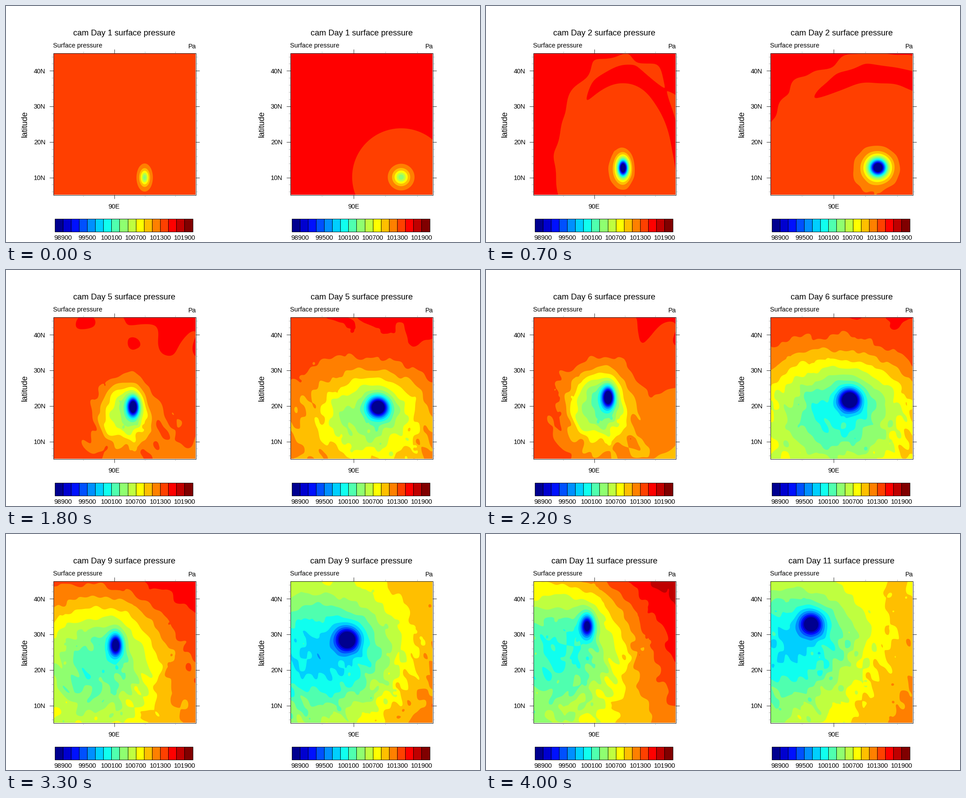
Animation of 1058 by 529 pixels, one loop 4.1 s. Source, as a matplotlib script:

```python
import numpy as np
import matplotlib.pyplot as plt
from matplotlib.animation import FuncAnimation
from matplotlib.patches import Rectangle

W, H, DPI = 1058, 529, 128
FRAMES, SHIFT = 41, 529
LEFT, TOP, SIZE = 106, 106, 317
KEYS = [0, 7, 14, 22, 33, 40]


def jet(i):
    t = np.interp(i, [0, 8, 9, 16], [0.5625, 2.5625, 2.75, 4.5])
    return [np.clip(min(t - k, 5 - 2 + k - t + (2 - 2 * k) + 2 * k - 2 + 0), 0, 1)
            for k in (2, 1, 0)]


COLORS = np.array([jet(i) for i in range(17)])

# Positions are panel-local pixels; corners are the ambient level NW, NE, SW, SE.
PANELS = [
    dict(aspect=0.58, lon_ticks=(173, 241.5, 309.5, 378),
         eye_x=[203.5, 200, 189, 167, 139, 120],
         eye_y=[278.5, 257, 222, 179, 143, 100],
         low_w=[10, 65, 130], low_h=[25, 80, 135],
         corners=[[13.5] * 4, [14.3] * 4, [13.9, 14.5, 13.4, 13.6],
                  [13.5, 14.3, 13.4, 11.7], [13.7, 14.6, 10.5, 12.2],
                  [12.3, 15.5, 9.0, 12.5]]),
    dict(aspect=1.0, lon_ticks=(705, 776, 847, 917.5),
         eye_x=[247, 240, 215, 177, 127, 91],
         eye_y=[277.5, 256, 218, 185, 131, 96],
         low_w=[10, 145, 155], low_h=[25, 115, 130],
         corners=[[14.3] * 4, [14.3] * 4, [13.9, 14.5, 13.6, 13.3],
                  [13.6, 14.2, 10.7, 11.6], [10.4, 11.8, 9.3, 12.8],
                  [11.4, 11.0, 9.0, 12.6]]),
]

X, Y = np.meshgrid(np.arange(SIZE) + 0.5, np.arange(SIZE) + 0.5)


def waves(rng, x_range, y_range):
    """Periodic sum of random waves, so that it can be rolled without a seam."""
    out = np.zeros_like(X)
    for _ in range(24):
        kx = rng.integers(*x_range) * rng.choice([-1, 1])
        ky = rng.integers(*y_range)
        out += np.cos(2 * np.pi * (kx * X + ky * Y) / SIZE + rng.uniform(0, 2 * np.pi))
    return out / np.sqrt(12)


def cells(rng, aspect):
    """Small ringed highs and lows."""
    out = np.zeros_like(X)
    for i in range(34):
        cx, cy = rng.uniform(15, SIZE - 15, 2)
        r2 = (((X - cx) / aspect) ** 2 + (Y - cy) ** 2) / rng.uniform(4, 7) ** 2
        out += (-1) ** i * 1.6 * (1 - 0.6 * r2) * np.exp(-r2)
    return out


for seed, p in enumerate(PANELS):
    rng = np.random.default_rng(seed + 4)
    p["coarse"] = waves(rng, (1, 5), (1, 5))
    p["fine"] = waves(rng, (3, 12), (2, 9)) + 1.6 * cells(rng, p["aspect"] ** 0.5)


def pressure(p, frame):
    """Pressure in colour steps: ambient, first wave front, wide low, roughness, eye."""
    ramp = min(frame / 7, 1)
    u, v = X / SIZE, Y / SIZE
    nw, ne, sw, se = (np.interp(frame, KEYS, c) for c in zip(*p["corners"]))
    field = (nw * (1 - u) + ne * u) * (1 - v) + (sw * (1 - u) + se * u) * v

    dx = (X - np.interp(frame, KEYS, p["eye_x"])) / p["aspect"]
    dy = Y - np.interp(frame, KEYS, p["eye_y"])
    rho = np.hypot(dx, dy)

    # Outgoing front with a crescent of higher pressure on its north-east side.
    front = 114 + 22 * frame
    strength = 0.7 * np.clip(2 - frame / 7, 0, 1)
    if p["aspect"] < 1:
        strength *= ramp
    north_east = np.clip((0.5 * dx - dy) / (rho + 1), 0, 1)
    crescent = np.exp(-((rho - 0.77 * front) / (0.07 * front)) ** 2)
    field += strength * (0.75 * ramp * north_east * crescent
                         - np.exp(-(rho / front) ** 4))

    # The wide low lags behind the eye.
    low_w = np.interp(frame, [0, 22, 33], p["low_w"])
    low_h = np.interp(frame, [0, 22, 33], p["low_h"])
    r_low = np.hypot((dx * p["aspect"] + frame) / low_w, (dy - 0.9 * frame) / low_h)
    depth = np.interp(frame, [0, 7, 14, 22, 40], [0, 1.2, 3.3, 5.2, 4.6])
    field -= depth * np.exp(-r_low ** 2.5)

    # Roughness drifts with the storm and is strongest south of the eye.
    drift = (-3 * frame, -3 * frame)
    mask = np.exp(-(r_low / 1.9) ** 4) * (0.3 + 0.7 / (1 + np.exp(-(dy - 15) / 22)))
    mask *= 1 - np.exp(-(rho / 45) ** 4)
    late = np.clip((frame - 5) / 9, 0, 1)
    field += late * (0.13 * np.roll(p["coarse"], drift, (0, 1))
                     + 0.34 * mask * np.roll(p["fine"], drift, (0, 1)))

    size = 17.5 + frame / 8
    eye_depth = np.interp(frame, [0, 7, 40], [5.6, 17, 10.5])
    field -= eye_depth * np.exp(-(rho / size) ** 1.5)
    return np.clip(field, 0.2, 15.8)


def shade(field):
    """Flat colour bands with one pixel of smoothing on each boundary."""
    gy, gx = np.gradient(field)
    edge = np.clip(np.rint(field), 1, 16).astype(int)
    mix = np.clip((field - edge) / (np.hypot(gx, gy) + 1e-3) + 0.5, 0, 1)[..., None]
    return COLORS[edge - 1] * (1 - mix) + COLORS[edge] * mix


plt.rcParams["font.family"] = "Liberation Sans"
fig = plt.figure(figsize=(W / DPI, H / DPI), dpi=DPI, facecolor="white")
ax = fig.add_axes([0, 0, 1, 1])


def text(x, y, s, px=14.4, ha="center", va="baseline", **kw):
    return ax.text(x, y, s, fontsize=px * 72 / DPI, ha=ha, va=va, color="black", **kw)


def line(x0, y0, x1, y1, major):
    ax.plot([x0, x1], [y0, y1], color="black" if major else "#888888",
            lw=0.45 if major else 0.35, solid_capstyle="butt", zorder=3)


def box(x, y, w, h, fill):
    ax.add_patch(Rectangle((x, y), w, h, fc=fill, ec="black", lw=0.5, zorder=3))


def build_panel(dx, lon_ticks):
    x0, x1, y1 = LEFT + dx, LEFT + SIZE + dx, TOP + SIZE
    image = ax.imshow(np.ones((SIZE, SIZE, 3)), extent=(x0, x1, y1, TOP),
                      interpolation="nearest", aspect="auto", zorder=1)
    box(x0 - 0.5, TOP - 0.5, SIZE + 1, SIZE + 1, "none")
    for lat in range(6, 45, 2):
        y, major = 384.5 - (lat - 10) * 7.97, lat % 10 == 0
        reach = 9 if major else 4
        line(x0 - reach, y, x0, y, major)
        line(x1, y, x1 + reach, y, major)
        if major:
            text(88 + dx, y + 5.2, f"{lat}N", ha="right")
    for i, x in enumerate(lon_ticks):
        reach = 9 if i == 1 else 4
        line(x, TOP - reach, x, TOP, i == 1)
        line(x, y1, x, y1 + reach, i == 1)
    text(lon_ticks[1], 453.5, "90E")
    text(42 + dx, 265, "latitude", 18.2, rotation=90, va="center")
    text(105 + dx, 92.5, "Surface pressure", ha="left")
    text(424 + dx, 95, "Pa", ha="right")
    cell = 308 / 17
    for i, color in enumerate(COLORS):
        x = 108.5 + dx + i * cell
        box(x, 476.5, cell, 29, color)
        if i % 3 == 1:
            text(x + 0.5, 524.5, str(98700 + 200 * i))
    return image, text(264.5 + dx, 66.5, "", 18.2)


artists = [build_panel(i * SHIFT, p["lon_ticks"]) for i, p in enumerate(PANELS)]
ax.set_xlim(0, W)
ax.set_ylim(H, 0)
ax.axis("off")


def draw(frame):
    for p, (image, title) in zip(PANELS, artists):
        image.set_data(shade(pressure(p, frame)))
        title.set_text(f"cam Day {frame // 4 + 1} surface pressure")
    return [a for pair in artists for a in pair]


anim = FuncAnimation(fig, draw, frames=FRAMES, interval=100, repeat=True,
                     repeat_delay=0, blit=False)
plt.show()
```
